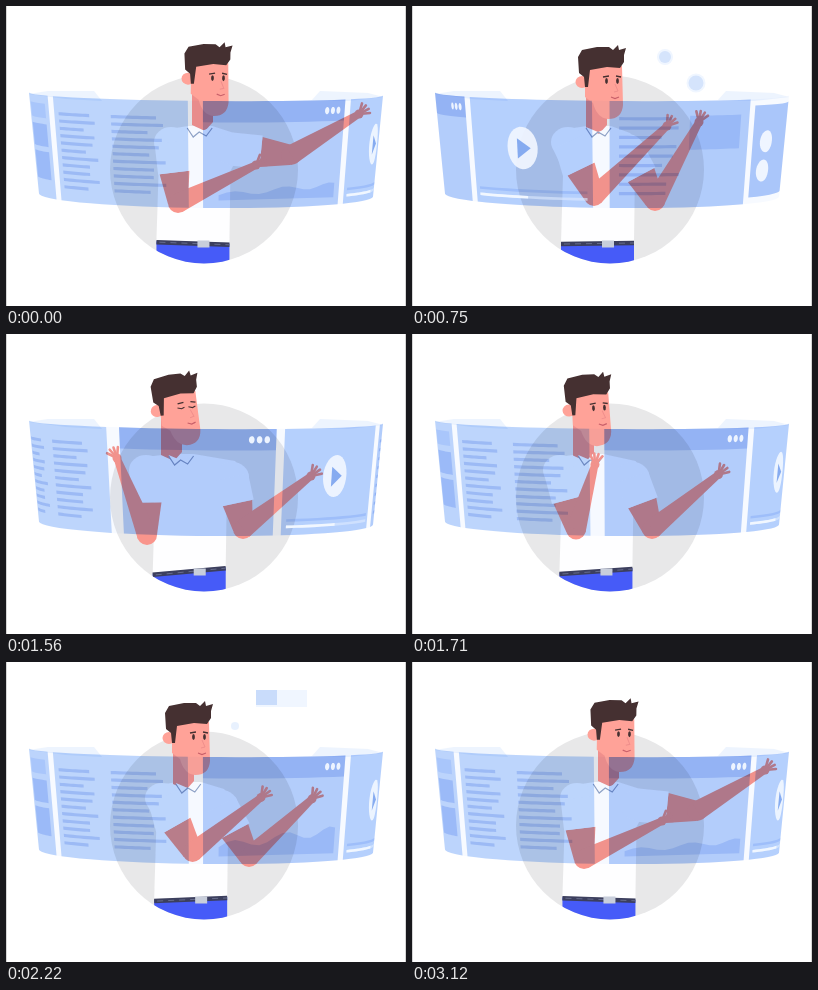
An HTML page with a canvas that plays this animation: 400x300 px, repeating every 3.15 s.

```html
<!DOCTYPE html>
<html lang="en">
<head>
<meta charset="utf-8">
<title>Ring of screens</title>
<style>
html, body { margin: 0; width: 100%; height: 100%; overflow: hidden; background: #fff; }
canvas { display: block; width: 400px; height: 300px; }
</style>
</head>
<body>
<canvas id="stage" width="400" height="300"></canvas>
<script>
const ctx = document.getElementById('stage').getContext('2d');
const LOOP = 3150, STEP = 30, RAD = Math.PI / 180;
const SKIN = '#ffa298', ARM = '#f9958c', SHADE = '#f08f8c', HAIR = '#453031', SHIRT = '#fefeff';

const clamp = p => Math.min(1, Math.max(0, p));
const mix = (a, b, p) => a + (b - a) * p;
const ramp = (t, a, b) => { const p = clamp((t - a) / (b - a)); return p * p * (3 - 2 * p); };
const flick = (t, start) => 1 - (1 - clamp((t - start) / 375)) ** 3;
const swell = (t, a, b) => Math.sin(Math.PI * clamp((t - a) / (b - a))) ** 2;

// head: x, y, tilt; arms: shoulder x, elbow x y, hand x y
const reach = { head: [202, 72, 1], left: [165, 172, 197, 250, 159], right: [225, 285, 149, 353, 108] };
const rest = { head: [190, 75, 0], left: [156, 187, 190, 255, 137], right: [215, 243, 195, 308, 139] };
const grab = { head: [171, 74, -6], left: [140, 141, 201, 111, 124], right: [226, 237, 195, 305, 142] };
const watch = { ...rest, head: [183, 75, 0] };
const tap = { head: [185, 75, 0], left: [161, 165, 199, 240, 157], right: [217, 232, 196, 305, 153] };
const acts = [[0, reach], [255, rest], [1150, rest], [1410, grab], [1560, grab], [1860, watch],
  [2250, watch], [2520, tap], [2750, tap], [3060, reach], [LOOP, reach]];

function poseAt(t) {
  const i = Math.max(1, acts.findIndex(([at]) => at >= t));
  const [[t0, a], [t1, b]] = [acts[i - 1], acts[i]];
  const p = ramp(t, t0, t1), pose = {};
  for (const part in a) pose[part] = a[part].map((v, k) => mix(v, b[part][k], p));
  const lift = swell(t, 270, 1230) + 0.4 * swell(t, 1800, 2300);
  pose.left[1] -= 5 * lift;
  pose.left[4] -= 17 * lift;
  pose.right[3] -= 21 * lift;
  pose.right[4] -= 23 * lift;
  return pose;
}

function poly(points, fill) {
  ctx.beginPath();
  points.forEach(([x, y]) => ctx.lineTo(x, y));
  ctx.closePath();
  ctx.fillStyle = fill;
  ctx.fill();
}

function oval(x, y, rx, ry, fill) {
  ctx.beginPath();
  ctx.ellipse(x, y, rx, ry, 0, 0, 7);
  ctx.fillStyle = fill;
  ctx.fill();
}

function stroke(points, color, width) {
  ctx.beginPath();
  points.forEach(([x, y]) => ctx.lineTo(x, y));
  ctx.strokeStyle = color;
  ctx.lineWidth = width;
  ctx.stroke();
}

function taper(x0, y0, w0, x1, y1, w1, fill) {
  const d = Math.hypot(x1 - x0, y1 - y0) || 1;
  const nx = (y0 - y1) / d / 2, ny = (x1 - x0) / d / 2;
  poly([[x0 + nx * w0, y0 + ny * w0], [x1 + nx * w1, y1 + ny * w1],
    [x1 - nx * w1, y1 - ny * w1], [x0 - nx * w0, y0 - ny * w0]], fill);
}

function drawArm([sx, ex, ey, hx, hy], sy) {
  const cx = (sx + ex) / 2, cy = (sy + ey) / 2;
  taper(cx, cy, 30, ex, ey, 20, ARM);
  oval(sx, sy, 17, 15, SHIRT);
  taper(sx, sy, 33, cx, cy, 33, SHIRT);
  oval(ex, ey, 10, 10, ARM);
  taper(ex, ey, 20, hx, hy, 7, ARM);
  oval(hx, hy, 4.5, 4.5, ARM);
  const dir = Math.atan2(hy - ey, hx - ex);
  ctx.lineCap = 'round';
  for (let f = -0.75; f < 0.6; f += 0.4) {
    stroke([[hx, hy], [hx + Math.cos(dir + f) * 11, hy + Math.sin(dir + f) * 11]], ARM, 2.6);
  }
  ctx.lineCap = 'butt';
}

function drawHead([x, y, tilt], open) {
  ctx.save();
  ctx.translate(x, y);
  poly([[-16, 5], [5, 5], [5, 44], [-3, 53], [-16, 47]], SHADE);
  ctx.rotate(tilt * RAD);
  oval(-20, 1, 6.5, 6, SKIN);
  ctx.beginPath();
  ctx.moveTo(-17, -15);
  ctx.lineTo(20, -15);
  ctx.lineTo(21, 24);
  ctx.quadraticCurveTo(20, 38, 6, 38);
  ctx.quadraticCurveTo(-5, 37, -9, 22);
  ctx.lineTo(-17, 16);
  ctx.fillStyle = SKIN;
  ctx.fill();
  poly([[-23, -8], [-24, -24], [-20, -31], [-5, -34], [7, -34], [11, -31], [16, -36], [17, -31],
    [24, -33], [22, -26], [22, -19], [18, -13], [5, -14], [-12, -11], [-14, 6], [-17, 6], [-18, -4]], HAIR);
  stroke([[1, -4], [7, -5]], HAIR, 1.3);
  stroke([[14, -5], [19, -4]], HAIR, 1.3);
  for (const ex of [4.5, 15.5]) {
    if (open) oval(ex, 0, 1.4, 2.9, HAIR);
    else stroke([[ex - 4, 0], [ex, 1.2], [ex + 3, 0]], HAIR, 1.1);
  }
  stroke([[13, 3], [16, 10], [12, 11]], SHADE, 1);
  stroke([[9, 16], [13, 17.5], [17, 16]], '#c9606a', 1.2);
  ctx.restore();
}

function drawMan(t) {
  const { head, left, right } = poseAt(t);
  const lean = head[0] - 190, cx = 188 + lean * 0.6;
  const l = 149 + lean * 0.12, r = l + 73, yl = 237 - lean * 0.15, yr = 236 + lean * 0.15;
  ctx.save();
  ctx.beginPath();
  ctx.rect(0, 0, 400, 190);
  ctx.arc(198, 163.5, 94, 0, Math.PI);
  ctx.clip();
  poly([[l, yl], [r, yr], [r, 262], [l, 262]], '#465bf8');
  poly([[cx - 13, 120], [left[0] - 8, 124], [left[0] - 15, 136], [l + 2, 170], [l, yl - 1], [r, yr - 1],
    [r + 1, 165], [right[0] + 13, 139], [right[0] + 3, 127], [cx + 11, 120]], SHIRT);
  stroke([[l, yl + 1], [r, yr + 1]], '#3c3f5e', 4.5);
  ctx.setLineDash([6, 5]);
  stroke([[l + 3, yl + 1], [r, yr + 1]], '#666c8c', 1);
  ctx.setLineDash([]);
  ctx.fillStyle = '#c8cedb';
  ctx.fillRect(l + 41, 234.5, 12, 7);
  drawHead(head, t < 1380 || t > 1650);
  poly([[cx - 14, 121], [cx - 2, 126], [cx + 11, 121], [cx + 6, 131], [cx - 2, 126], [cx - 8, 132]], SHIRT);
  stroke([[cx - 14, 122], [cx - 8, 131], [cx - 2, 126], [cx + 5, 130], [cx + 11, 122]], '#93a5c6', 1.2);
  drawArm(right, 143);
  drawArm(left, 136);
  ctx.restore();
}

// A point on the curved wall: angle in degrees, height from 0 to 1.
function wall(deg, v) {
  const a = Math.max(-90, Math.min(90, deg)) * RAD, s = Math.sin(a), c = Math.cos(a);
  const top = 88 + 7 * c + s * 1.5, low = 189 + 13 * c + s * 1.5;
  return [200 + (177 - 10 * v) * s, mix(top, low, v)];
}

function screen(center, width, tint, paint, inset = 0) {
  const start = center - width / 2;
  if (start > 89 || start + width < -89) return;
  const at = (u, v) => wall(start + u * width, mix(inset, 1 - inset, v));
  const patch = (u0, v0, u1, v1, fill, mode = 'multiply') => {
    const pts = [];
    for (let i = 0; i <= 10; i++) pts.push(at(mix(u0, u1, i / 10), v0));
    for (let i = 10; i >= 0; i--) pts.push(at(mix(u0, u1, i / 10), v1));
    ctx.globalCompositeOperation = mode;
    poly(pts, fill);
  };
  const disc = (u, v, ru, rv, fill) => {
    const pts = [];
    for (let a = 0; a < 6.28; a += 0.2) pts.push(at(u + ru * Math.cos(a), v + rv * Math.sin(a)));
    ctx.globalCompositeOperation = 'source-over';
    poly(pts, fill);
  };
  patch(0, 0, 1, 1, tint);
  paint({ at, patch, disc });
  ctx.globalCompositeOperation = 'source-over';
}

function lines(patch, u, width, rows, shown = 1) {
  for (let i = 0; i < rows; i++) {
    const p = clamp(shown * rows - i);
    const v = 0.15 + i * 0.7 / (rows - 1), len = width * (0.84 + 0.16 * Math.sin(i * 2.3));
    if (p) patch(u, v, u + len * p, v + 0.03, '#d3dff8');
  }
}

function drawWall(t) {
  const turn = 25.5 - 108.5 * (flick(t, 0) - flick(t, 1425));

  // Far side, just visible over the rim.
  ctx.globalCompositeOperation = 'multiply';
  poly([[23, 88], [42, 85], [88, 85], [96, 95], [60, 93]], '#edf4fe');
  poly([[377, 91], [362, 87], [314, 85], [306, 94], [342, 95]], '#edf4fe');
  const rim = [];
  for (let a = -90; a <= 90; a += 6) rim.push(wall(a, 0));
  for (let a = 90; a >= -90; a -= 6) rim.push(wall(a, 1));
  poly(rim, '#f7faff');

  screen(turn - 116, 54, '#c2d9fc', ({ patch }) => {
    patch(0.62, 0.08, 0.95, 0.22, '#e6effe');
    patch(0.62, 0.28, 0.95, 0.5, '#d2e0fb');
    patch(0.62, 0.55, 0.95, 0.82, '#d2e0fb');
  });
  screen(turn - 58.4, 54, '#c3dafc', ({ patch }) => {
    lines(patch, 0.05, 0.34, 11);
    lines(patch, 0.5, 0.36, 11);
  });
  const grow = ramp(t, 1860, 2480) - 0.65 * ramp(t, 2700, 3060);
  const chart = t < 1400 ? 0.35 * (1 - ramp(t, 0, 200)) : grow;
  screen(turn, 53, '#b9d1fb', ({ at, patch, disc }) => {
    patch(0, 0, 1, 0.2, '#d3dff8');
    if (chart > 0) {
      const hill = [at(0.1, 0.93)];
      for (let p = 0; p <= 1; p += 1 / 16) {
        hill.push(at(0.1 + p * 0.85, 0.93 - chart * (0.14 + 0.3 * p * (1.2 - p * 0.5) + 0.07 * Math.sin(p * 15))));
      }
      hill.push(at(0.95, 0.93));
      ctx.globalCompositeOperation = 'multiply';
      poly(hill, '#dbe6fb');
    }
    for (let u = 0.84; u < 0.96; u += 0.05) disc(u, 0.1, 0.018, 0.034, '#edf4ff');
  });
  screen(turn + 53, 47, '#bbd4fd', ({ at, patch, disc }) => {
    disc(0.47, 0.46, 0.125, 0.2, 'rgba(240,246,255,.93)');
    poly([at(0.43, 0.37), at(0.54, 0.46), at(0.43, 0.56)], '#86abf0');
    patch(0.04, 0.85, 0.96, 0.875, '#dfe9fc');
    patch(0.04, 0.91, 0.96, 0.935, 'rgba(224,236,255,.6)', 'source-over');
    patch(0.04, 0.91, 0.5, 0.935, '#f1f7ff', 'source-over');
  });
  const typed = ramp(t, 330, 720);
  screen(turn + 108.4, 52.4, '#b7d0fb', ({ patch }) => {
    lines(patch, 0.06, 0.4, 9, typed);
    ctx.globalAlpha = typed;
    patch(0.52, 0.14, 0.92, 0.46, '#dde7fb');
    ctx.globalAlpha = 1;
  });
  screen(turn + 163.4, 52, '#b0cafa', ({ disc }) => {
    disc(0.17, 0.4, 0.085, 0.12, '#eff5ff');
    disc(0.15, 0.72, 0.085, 0.12, '#eff5ff');
  }, 0.06);
}

// Small parts that rise out of the ring and sink back.
function popup(t, from, to, y, draw) {
  const k = ramp(t, from, from + 200) * (1 - ramp(t, to - 180, to));
  if (!k) return;
  ctx.save();
  ctx.globalAlpha = k;
  ctx.translate(0, (1 - k) * (95 - y));
  draw();
  ctx.restore();
}

function bubble(x, y, r) {
  oval(x, y, r + 2, r + 2, '#f0f6ff');
  oval(x, y, r, r, '#d5e4fc');
}

function drawPopups(t) {
  popup(t, 480, 1020, 51, () => bubble(253, 51, 6));
  popup(t, 540, 1080, 77, () => bubble(284, 77, 7.5));
  popup(t, 1980, 2790, 36, () => {
    ctx.fillStyle = '#f0f6ff';
    ctx.fillRect(250, 28, 51, 17);
    ctx.fillStyle = '#c9dcfb';
    ctx.fillRect(250, 28, 21, 15);
  });
  popup(t, 2100, 2730, 47, () => oval(229, 47, 4, 4, '#dce9fd'));
}

function draw(t) {
  ctx.globalCompositeOperation = 'source-over';
  ctx.fillStyle = '#fff';
  ctx.fillRect(0, 0, 400, 300);
  oval(198, 163.5, 94, 94, '#e8e8e9');
  drawMan(t);
  drawWall(t);
  drawPopups(t);
  ctx.fillStyle = '#d6d6d6';
  ctx.fillRect(0, 0, 1, 300);
  ctx.fillRect(399, 0, 1, 300);
}

const begin = performance.now();
function tick() {
  const t = (performance.now() - begin) % LOOP;
  draw(Math.floor(t / STEP) * STEP);
  requestAnimationFrame(tick);
}
tick();
</script>
</body>
</html>
```
